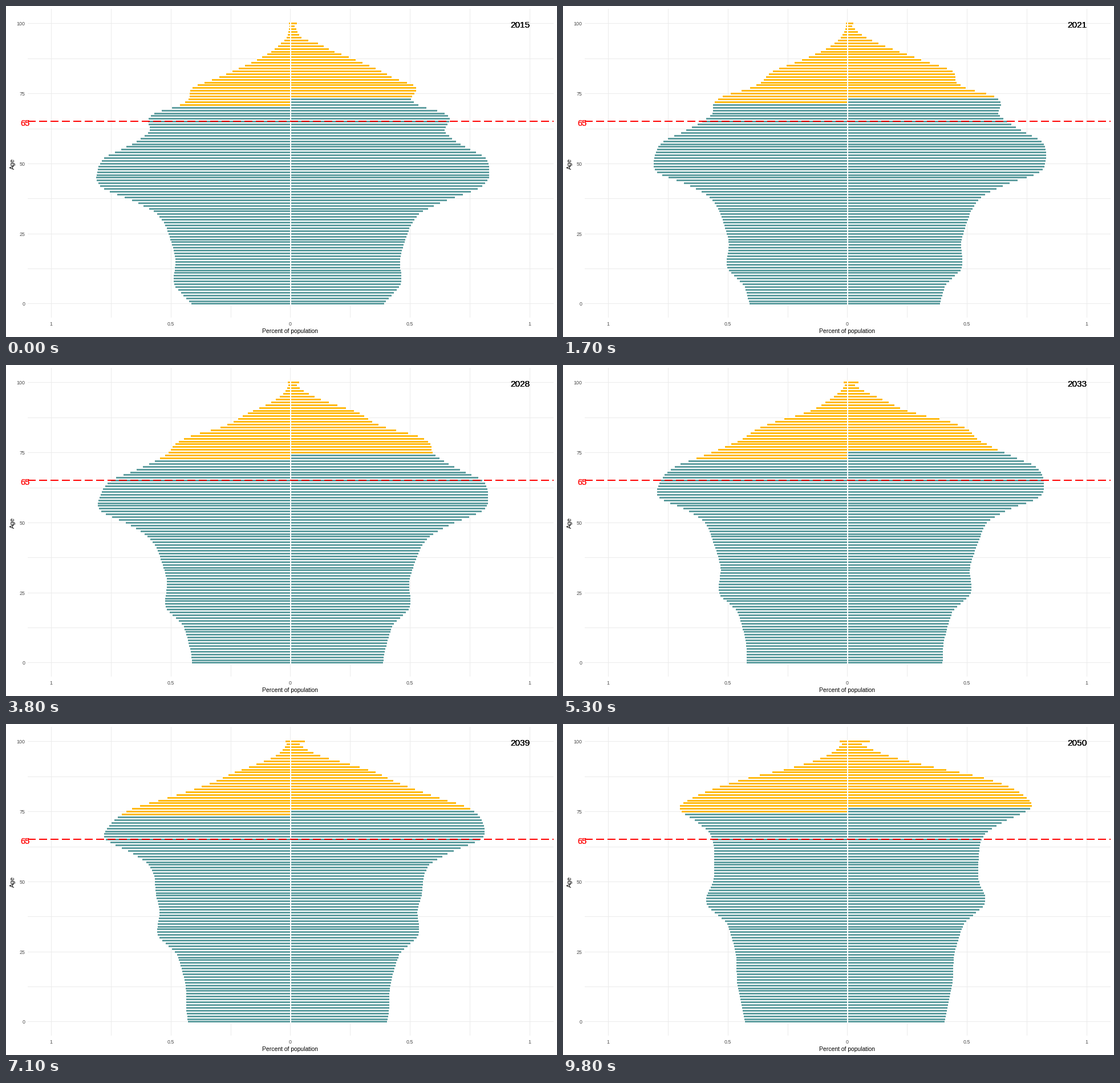
These frames come from a looping animation (966 by 580 pixels, 10 s). A matplotlib script:

```python
import numpy as np
import matplotlib.pyplot as plt
from matplotlib.animation import FuncAnimation
from matplotlib.collections import PolyCollection

W, H, DPI = 966, 580, 64
PX = 72 / DPI  # points per pixel
TEAL, GOLD, GRID = "#5F9EA0", "#FFB90F", "#EBEBEB"
MID = 498.5
AGES = np.arange(101)

plt.rcParams["font.family"] = "Liberation Sans"

# Size of a cohort at birth (px) at the turning points of the birth rate
BIRTHS = np.array([
    (1915, 80), (1920, 55), (1922, 88), (1925, 98), (1929, 120), (1934, 149),
    (1938, 173), (1942, 163), (1944, 170), (1947, 202), (1949, 207),
    (1953, 200), (1956, 210), (1960, 235), (1963, 257), (1966, 264),
    (1971, 267), (1973, 265), (1979, 219), (1983, 196), (1988, 187),
    (1998, 184), (2008, 196), (2012, 184), (2015, 174), (2025, 171),
    (2037, 179), (2050, 180)], float).T


def row(age):
    return np.round(521.45 - 4.91 * np.asarray(age))


def smooth(x, xs, ys):
    """Monotone cubic through the points (xs, ys)."""
    h = np.diff(xs)
    d = np.diff(ys) / h
    same = d[1:] * d[:-1] > 0
    inner = np.where(same, 2 * d[1:] * d[:-1] / np.where(same, d[1:] + d[:-1], 1), 0)
    m = np.concatenate([d[:1], inner, d[-1:]])
    k = np.clip(np.searchsorted(xs, x, "right") - 1, 0, len(h) - 1)
    t = (x - xs[k]) / h[k]
    return (ys[k] * (1 + 2 * t) * (1 - t) ** 2 + h[k] * m[k] * t * (1 - t) ** 2
            + ys[k + 1] * t * t * (3 - 2 * t) + h[k] * m[k + 1] * t * t * (t - 1))


def widths(size, growth, ageing, death):
    """Cohorts grow by migration up to 45, then shrink by Gompertz mortality."""
    w = size * np.exp(growth * np.minimum(AGES, 45)
                      - death * np.exp(ageing * (AGES - 80)))
    w[100] *= 2.2  # everyone of 100 and over
    return w


def pyramid(year):
    born = year - AGES
    size = smooth(born, *BIRTHS)
    ratio = np.interp(born, [1922, 1929, 1934, 1942, 1956, 1983],
                      [1.66, 1.36, 1.175, 1.07, 1.035, 0.945])
    eras = [1925, 1956, 1973]
    men = widths(size, 0.0055, 0.12, np.interp(born, eras, [0.40, 0.325, 0.21]))
    women = widths(size * ratio, 0.0062, 0.132,
                   np.interp(born, eras, [0.25, 0.185, 0.085]))
    return MID - men, MID + women


def boxes(x0, x1, top, bottom):
    x0, x1 = np.broadcast_to(x0, 101), np.broadcast_to(x1, 101)
    t, b = row(AGES) + top, row(AGES) + bottom
    return np.stack([np.stack([x0, x1, x1, x0], 1), np.stack([t, t, b, b], 1)], 2)


def year_at(ms):
    if ms < 200:
        return 2015
    if ms < 8600:
        return 2016 + (ms - 200) // 300
    return 2044 + (ms - 8600) // 200


fig = plt.figure(figsize=(W / DPI, H / DPI), dpi=DPI, facecolor="white")
ax = fig.add_axes([0, 0, 1, 1])
ax.set(xlim=(0, W), ylim=(H, 0))
ax.axis("off")


def label(x, y, s, size, color, ha="center", **kw):
    return ax.text(x, y, s, fontsize=size * PX, color=color, ha=ha, **kw)


# Grid and axes
thin = dict(colors=GRID, lw=PX, zorder=1, snap=False)
ax.hlines(row(np.arange(0, 101, 12.5)) + 0.5, 38, 960, **thin)
ax.vlines(np.round(498.45 + 104.88 * np.arange(-4, 5)) + 0.5, 5, 546, **thin)
for age in range(0, 101, 25):
    label(33.5, row(age) + 4, str(age), 8.9, "#4D4D4D", "right")
for k, s in enumerate(("1", "0.5", "0", "0.5", "1")):
    label(498.4 + 209.8 * (k - 2), 559.5, s, 8.9, "#4D4D4D")
label(498.3, 573, "Percent of population", 10.4, "black")
label(12, 276, "Age", 10.6, "black", va="center", rotation=90)

# Bars on a white backing
flat = dict(edgecolors="none", linewidths=0, antialiaseds=False)
backing = PolyCollection([], facecolors="white", zorder=2, **flat)
bars = PolyCollection([], zorder=3, **flat)
ax.add_collection(backing, autolim=False)
ax.add_collection(bars, autolim=False)

ax.plot([38, 960], [202, 202], color="red", lw=2 * PX, ls=(0, (7, 3)),
        dash_capstyle="butt", zorder=4)

# Stacked copies give the heavy look of overprinted text
for _ in range(2):
    label(33, 209.5, "65", 14.8, "red", zorder=5)
year_labels = [label(901, 38, "", 15.4, "black", zorder=5) for _ in range(3)]


def draw(i):
    year = year_at(i * 100)
    left, right = pyramid(year)
    backing.set_verts(boxes(left - 1, right + 1, -2, 3))
    bars.set_verts(np.concatenate([boxes(left, 498, -1, 2),
                                   boxes(500, np.maximum(right, 501), -1, 2)]))
    old_left = 71 + int((year - 2010.5) / 8.5)
    old_right = 74 + int((year - 2011.5) / 10)
    bars.set_facecolor([GOLD if a >= old else TEAL
                        for old in (old_left, old_right) for a in AGES])
    for t in year_labels:
        t.set_text(str(year))
    return [backing, bars, *year_labels]


anim = FuncAnimation(fig, draw, frames=100, interval=100, repeat=True,
                     repeat_delay=0, blit=False)
plt.show()
```
